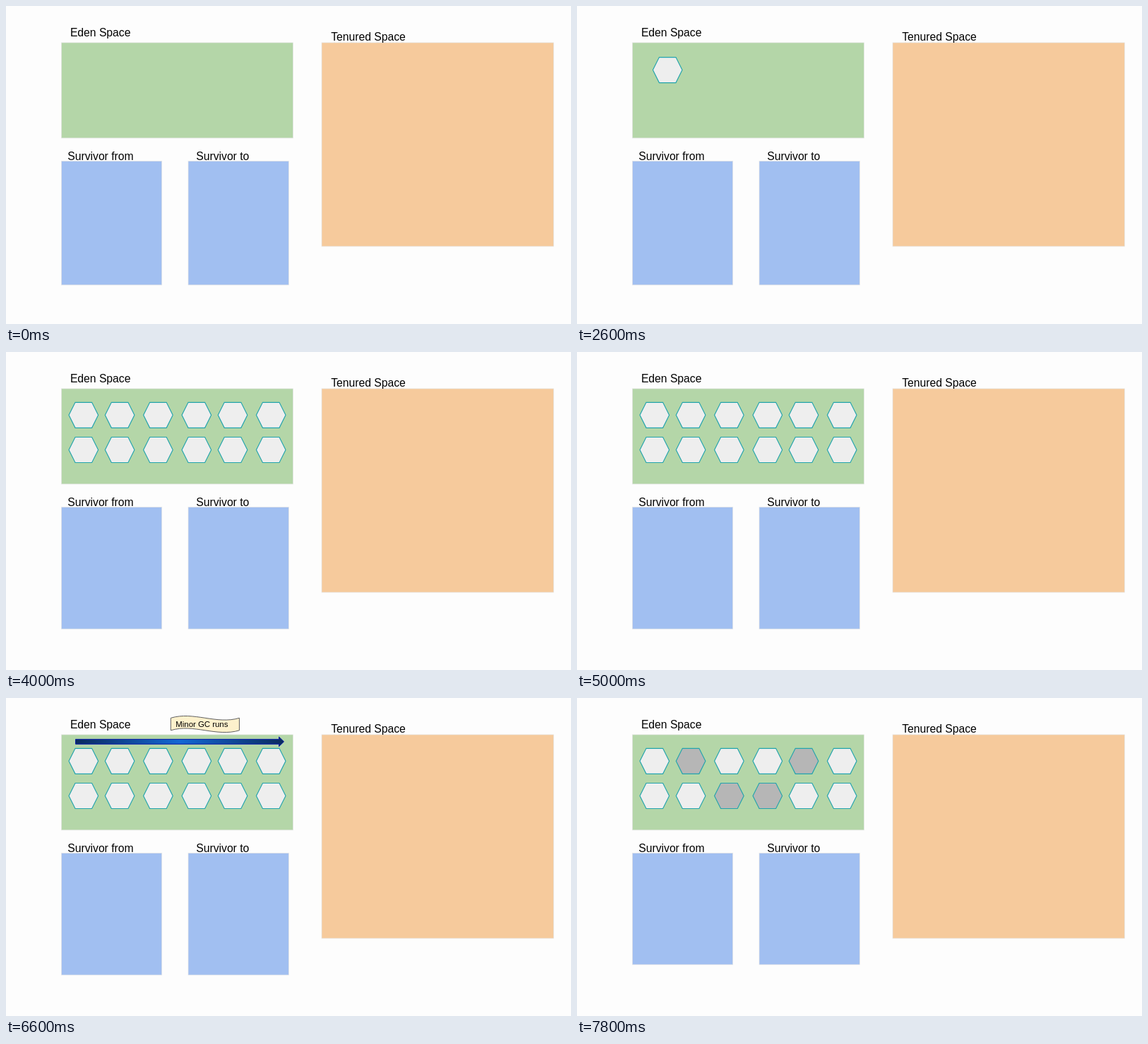
These frames come from a looping animation (800 by 450 pixels, 8 s). An HTML page:

```html
<!DOCTYPE html>
<html lang="en">
<head>
<meta charset="utf-8">
<title>Heap spaces</title>
<style>
html, body { margin: 0; width: 100%; height: 100%; overflow: hidden; background: #fdfdfd; }
svg { display: block; width: 800px; height: 450px; }
text { font: 15.7px "Liberation Sans", Arial, sans-serif; }
.space { stroke: #e4e4e4; stroke-width: .7; }
.hex { fill: #eee; stroke: #22a3ad; stroke-width: 1.15; }
.dead .old { fill: #b6b6b6; }
</style>
</head>
<body>
<svg viewBox="0 0 800 450">
  <defs>
    <linearGradient id="shine">
      <stop offset="0" stop-color="#0a2b5e"/>
      <stop offset=".5" stop-color="#1468d4"/>
      <stop offset="1" stop-color="#0a2b5e"/>
    </linearGradient>
  </defs>
  <rect class="space" x="78.4" y="51.9" width="328" height="135" fill="#b4d6a8"/>
  <rect class="space" x="447" y="51.9" width="328.3" height="288.2" fill="#f6ca9c"/>
  <rect class="space survivor" x="78.4" y="219.5" width="142.3" fill="#a1bff1"/>
  <rect class="space survivor" x="258" y="219.5" width="142.3" fill="#a1bff1"/>
  <text x="90.9" y="42.7">Eden Space</text>
  <text x="460.2" y="48.6">Tenured Space</text>
  <text x="87.3" y="218">Survivor from</text>
  <text x="269.3" y="218">Survivor to</text>
  <g id="first"></g>
  <g id="objects"></g>
  <path id="arrow" d="M98.5 58.4H386.5V55L393.5 61.8L386.5 68.6V65.2H98.5Z" fill="url(#shine)" stroke="#0718a8"/>
  <g id="banner">
    <path d="M233.3 28.3C265.7 18.5 298 38 330.4 28.3V45.8C298 55.5 265.7 36 233.3 45.8Z" fill="#fdf1cc" stroke="#5f5f5f"/>
    <text x="240.3" y="41" style="font-size:11.4px">Minor GC runs</text>
  </g>
</svg>
<script>
const LOOP = 8000, FIRST = 1400, FILL = 2800, SCAN = 5000, LABEL = 6200, MARK = 7800;
const $ = id => document.getElementById(id);
const columns = [89, 140.3, 194.6, 249, 300.2, 354.4];
const garbage = [1, 4, 8, 9];

const hexagon = (x, y, old) =>
  `<path class="hex${old ? " old" : ""}" d="M${x} ${y + 18}l9 -18h23.6l9 18l-9 18h-23.6Z"/>`;

$("first").innerHTML = hexagon(107.4, 72.6);
$("objects").innerHTML = [71.3, 120.5].map((y, row) =>
  columns.map((x, col) => hexagon(x, y, garbage.includes(row * 6 + col))).join("")).join("");

const survivors = document.querySelectorAll(".survivor");
const progress = (t, start, length) => Math.min(1, Math.max(0, (t - start) / length));
const show = (id, on) => $(id).setAttribute("display", on ? "inline" : "none");

function draw(t) {
  show("first", t >= FIRST && t < FILL);
  $("first").setAttribute("opacity", progress(t, FIRST - 100, 300));

  show("objects", t >= FILL);
  $("objects").setAttribute("class", t >= MARK ? "dead" : "");

  // The arrow flies in from the left edge and slows down.
  const left = 1 - progress(t, SCAN, 600);
  show("arrow", t > SCAN && t < MARK);
  $("arrow").setAttribute("transform", `translate(${-396 * left * left} 0)`);

  show("banner", t >= LABEL && t < MARK);
  $("banner").setAttribute("opacity", progress(t, LABEL, 400));

  const bottom = t < FILL ? 394.8 : t < MARK ? 392 : 377.2;
  survivors.forEach(s => s.setAttribute("height", bottom - 219.5));
}

const start = performance.now();
function tick() {
  draw((performance.now() - start) % LOOP);
  requestAnimationFrame(tick);
}
tick();
</script>
</body>
</html>
```
